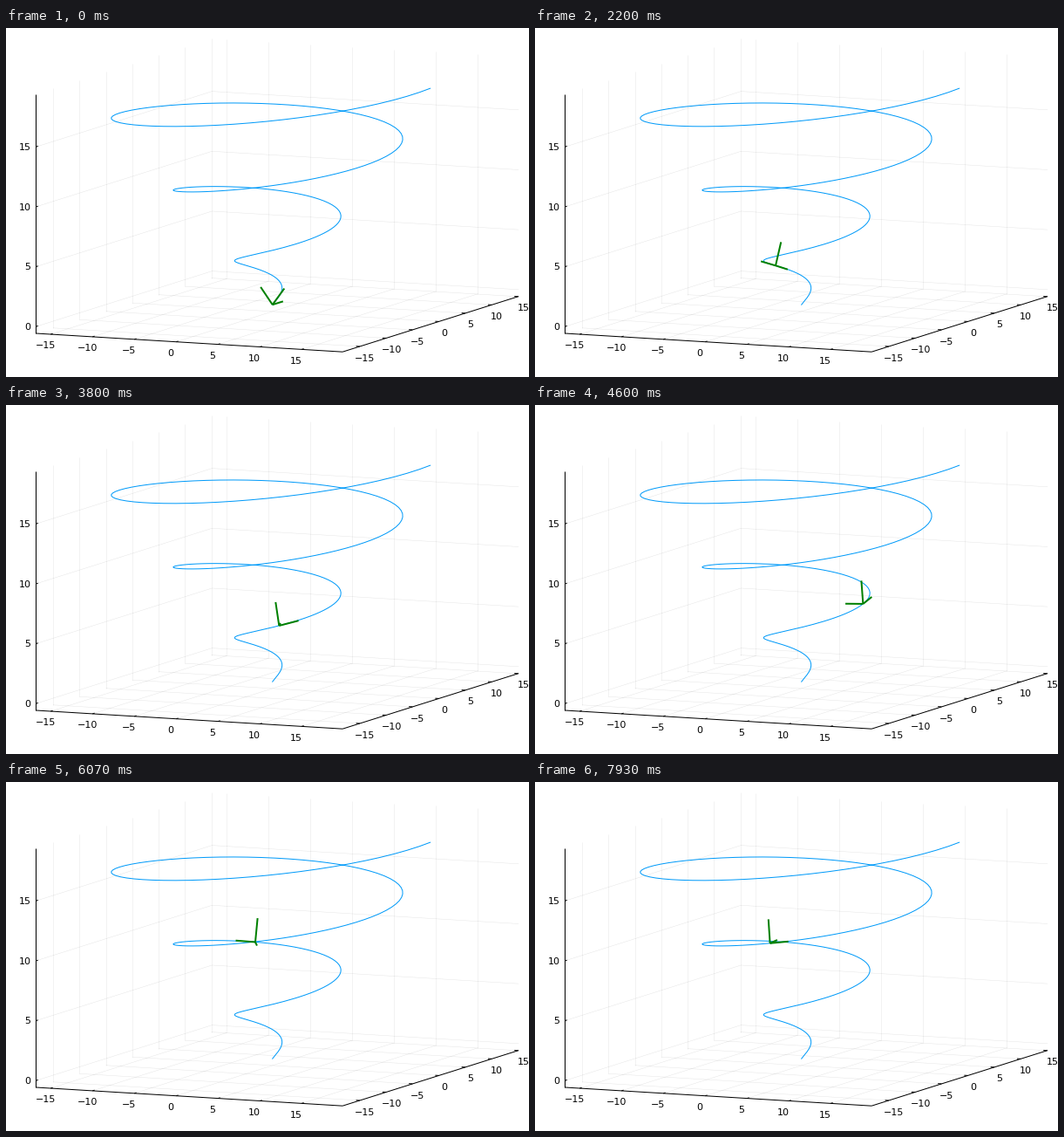
These frames come from a looping animation (600 px wide and 400 px high, 8000 ms). A matplotlib script:

```python
import numpy as np
import matplotlib.pyplot as plt
from matplotlib.animation import FuncAnimation
from matplotlib.collections import LineCollection

W, H, DPI = 600, 400, 100
LOOP_MS, TICK_MS = 8000, 20
STEPS = 120  # poses per loop
PX = 72 / DPI  # points per pixel
BLUE, GREEN = "#009af9", "#008000"

# Conical helix
ts = np.linspace(0, 6 * np.pi, 200)


def helix(t):
    return np.array([t * np.cos(t), t * np.sin(t), t])


curve = helix(ts)
pad = 0.03 * np.ptp(curve, axis=1)
lo, hi = curve.min(axis=1) - pad, curve.max(axis=1) + pad

# Parallel projection: screen position of the box corner and of its three edges
CORNER = np.array([34.35, 350.0])
EDGES = np.array([[351.8, 21.2], [202.0, -63.6], [0.0, -274.4]])


def project(points):
    """Map an array of shape (3, n) to screen x and y."""
    unit = (np.asarray(points, float).T - lo) / (hi - lo)
    return (CORNER + unit @ EDGES).T


def frenet(t):
    c, s = np.cos(t), np.sin(t)
    d1 = np.array([c - t * s, s + t * c, 1.0])
    d2 = np.array([-2 * s - t * c, 2 * c - t * s, 0.0])
    tangent = d1 / np.linalg.norm(d1)
    binormal = np.cross(d1, d2)
    binormal /= np.linalg.norm(binormal)
    return tangent, np.cross(binormal, tangent), binormal


fig = plt.figure(figsize=(W / DPI, H / DPI), dpi=DPI, facecolor="white")
ax = fig.add_axes([0, 0, 1, 1])
ax.set_xlim(0, W)
ax.set_ylim(H, 0)
ax.axis("off")


def add_lines(pairs, width, alpha=1):
    segments = [project(np.transpose(pair)).T for pair in pairs]
    ax.add_collection(LineCollection(segments, colors=[(0, 0, 0, alpha)],
                                     linewidths=width * PX),
                      autolim=False)


def label(value, point, dx, dy, ha="center"):
    x, y = project(np.transpose([point])).ravel()
    text = str(value).replace("-", "\u2212")
    ax.text(x + dx, y + dy, text, ha=ha, va="baseline",
            family="DejaVu Sans", size=11.1 * PX, color="black")


(x0, y0, z0), (x1, y1, z1) = lo, hi
tick_x, tick_y = 0.012 * (x1 - x0), 0.012 * (y1 - y0)

grid = []
axes = [((x0, y0, z0), (x1, y0, z0)),
        ((x1, y0, z0), (x1, y1, z0)),
        ((x0, y0, z0), (x0, y0, z1))]

for v in range(-15, 16, 5):
    grid += [((v, y0, z0), (v, y1, z0)), ((v, y1, z0), (v, y1, z1)),
             ((x0, v, z0), (x1, v, z0)), ((x0, v, z0), (x0, v, z1))]
    axes += [((v, y0, z0), (v, y0 + tick_y, z0)),
             ((x1, v, z0), (x1 - tick_x, v, z0))]
    label(v, (v, y0, z0), -6.1, 16.4)
    label(v, (x1, v, z0), 6.1, 16.6)

for v in range(0, 16, 5):
    grid += [((x0, y0, v), (x0, y1, v)), ((x0, y1, v), (x1, y1, v))]
    axes.append(((x0, y0, v), (x0, y0 + tick_y, v)))
    label(v, (x0, y0, v), -5.8, 3.9, "right")

add_lines(grid, 0.5, alpha=0.1)
add_lines(axes, 1.0)

ax.plot(*project(curve), color=BLUE, lw=PX)
arms = [ax.plot([], [], color=GREEN, lw=2 * PX, solid_capstyle="butt")[0]
        for _ in range(3)]


def update(i):
    # Each pose starts on the clock tick nearest to its due time
    step = int((i + 0.75) * TICK_MS * STEPS / LOOP_MS)
    t = ts[step]
    p = helix(t)
    for arm, v in zip(arms, frenet(t)):
        arm.set_data(*project(np.array([p, p + 2 * v]).T))
    return arms


anim = FuncAnimation(fig, update, frames=LOOP_MS // TICK_MS, interval=TICK_MS,
                     repeat=True, repeat_delay=0, blit=False)
plt.show()
```
